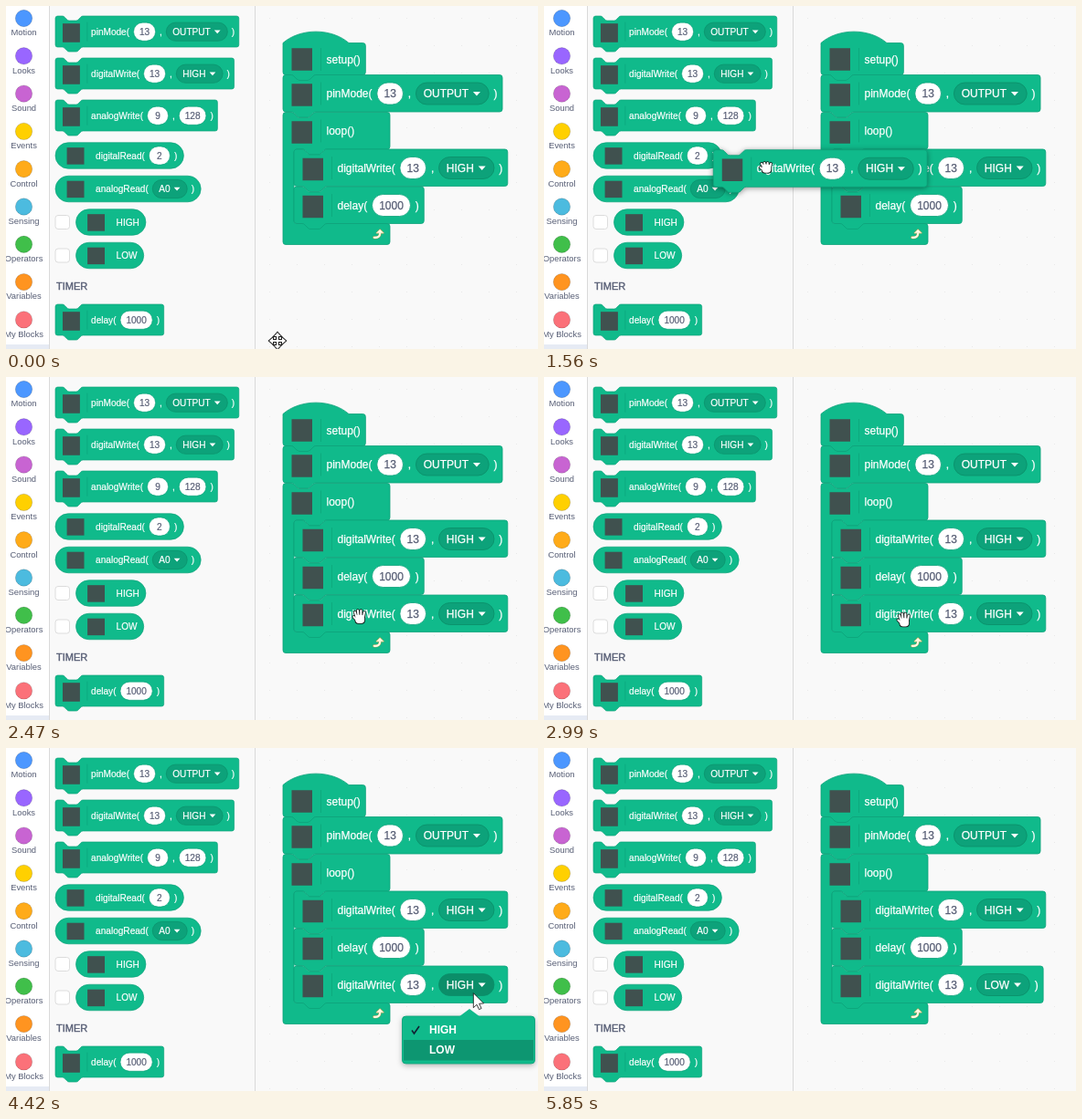
An HTML page with a canvas that plays this animation: 582 px wide and 376 px high, repeating every 6.63 s.

```html
<!DOCTYPE html>
<html lang="en">
<head>
<meta charset="utf-8">
<title>Block editor</title>
<style>
html, body { margin: 0; width: 100%; height: 100%; overflow: hidden; background: #f9f9f9; }
canvas { display: block; width: 582px; height: 376px; }
</style>
</head>
<body>
<canvas id="stage"></canvas>
<script>
const W = 582, H = 376, LOOP = 6630, STEP = 130;
const GREEN = '#10ba8b', MID = '#0da27a', DARK = '#0b8e69', TILE = '#40514f', INK = '#575e75';
const FONT = '"Liberation Sans", Arial, sans-serif';
const GAP = 5.3, PALETTE = 0.84;

const canvas = document.getElementById('stage');
const ctx = canvas.getContext('2d');
const ratio = window.devicePixelRatio || 1;
canvas.width = W * ratio;
canvas.height = H * ratio;

const CATEGORIES = [
  ['Motion', '#4c97ff'], ['Looks', '#9966ff'], ['Sound', '#c864d2'],
  ['Events', '#ffd000'], ['Control', '#ffab19'], ['Sensing', '#4cbbdf'],
  ['Operators', '#40bf4a'], ['Variables', '#ff9420'], ['My Blocks', '#fb7179']
];

// '#' marks a number field, '@' a dropdown
const PIN_MODE = ['pinMode(', '#13', ',', '@OUTPUT', ')'];
const WRITE_HIGH = ['digitalWrite(', '#13', ',', '@HIGH', ')'];
const WRITE_LOW = ['digitalWrite(', '#13', ',', '@LOW', ')'];
const DELAY = ['delay(', '#1000', ')'];

// A thin outline gives the medium weight
function text(str, x, y, { color = '#fff', size = 12, align = 'left', weight = '', medium = 0.25 } = {}) {
  ctx.font = `${weight} ${size}px ${FONT}`;
  ctx.textAlign = align;
  ctx.fillStyle = ctx.strokeStyle = color;
  ctx.fillText(str, x, y + size * 0.35);
  if (!medium) return;
  ctx.lineWidth = medium;
  ctx.strokeText(str, x, y + size * 0.35);
}

function box(x, y, w, h, r, fill, stroke) {
  ctx.beginPath();
  ctx.roundRect(x, y, w, h, r);
  ctx.fillStyle = fill;
  ctx.fill();
  if (stroke) {
    ctx.strokeStyle = stroke;
    ctx.lineWidth = 0.8;
    ctx.stroke();
  }
}

function at(x, y, scale, draw) {
  ctx.save();
  ctx.translate(x, y);
  ctx.scale(scale, scale);
  draw();
  ctx.restore();
}

function partWidth(part) {
  ctx.font = `12px ${FONT}`;
  const kind = part[0];
  if (kind === '#') return Math.max(27.5, ctx.measureText(part.slice(1)).width + 15.3);
  if (kind === '@') return ctx.measureText(part.slice(1)).width + 30.5;
  return ctx.measureText(part).width;
}

const rowWidth = parts => parts.reduce((sum, p) => sum + partWidth(p) + GAP, -GAP);

function drawRow(parts, x, y, open) {
  for (const part of parts) {
    const w = partWidth(part), label = part.slice(1);
    if (part[0] === '#') {
      box(x, y - 12, w, 24, 12, '#fff', MID);
      text(label, x + w / 2, y, { color: INK, align: 'center' });
    } else if (part[0] === '@') {
      box(x, y - 12, w, 24, 12, open ? DARK : MID, DARK);
      text(label, x + 8.3, y);
      const a = x + w - 17.3;
      ctx.beginPath();
      ctx.moveTo(a, y - 2);
      ctx.lineTo(a + 8, y - 2);
      ctx.lineTo(a + 4, y + 2.5);
      ctx.closePath();
      ctx.fill();
    } else {
      text(part, x, y);
    }
    x += w + GAP;
  }
}

// Connector edge; dir -1 traces it right to left
function notch(x, y, dir) {
  const px = u => x + (dir > 0 ? u : 45 - u);
  const line = (u, v) => ctx.lineTo(px(u), y + v);
  const curve = (a, b, u, v) => ctx.quadraticCurveTo(px(a), y + b, px(u), y + v);
  line(9, 0);
  curve(11, 0, 12, 1.5);
  line(15, 4.5);
  curve(16, 6, 18, 6);
  line(27, 6);
  curve(29, 6, 30, 4.5);
  line(33, 1.5);
  curve(34, 0, 36, 0);
}

function blockPath(w, h, hat) {
  ctx.beginPath();
  if (hat) {
    ctx.moveTo(0, 3);
    ctx.lineTo(0, 0);
    ctx.bezierCurveTo(19, -16.5, 53, -16.5, 72, 0);
  } else {
    ctx.moveTo(0, 3);
    ctx.arcTo(0, 0, 3, 0, 3);
    notch(0, 0, 1);
  }
  ctx.arcTo(w, 0, w, 3, 3);
  ctx.arcTo(w, h, w - 3, h, 3);
  notch(0, h, -1);
  ctx.arcTo(0, h, 0, h - 3, 3);
  ctx.closePath();
}

function paint(fill = GREEN, stroke = MID) {
  ctx.fillStyle = fill;
  ctx.fill();
  ctx.shadowColor = 'transparent';
  if (!stroke) return;
  ctx.strokeStyle = stroke;
  ctx.lineWidth = 0.8;
  ctx.stroke();
}

function tile(x, y, h) {
  ctx.fillStyle = TILE;
  ctx.fillRect(x, y - h / 2, 22.5, h);
}

function divider(y, h) {
  ctx.fillStyle = 'rgba(11,142,105,.35)';
  ctx.fillRect(41, y - h / 2, 1, h);
}

function block(x, y, parts, { scale = 1, hat = false, open = false, shadow = false } = {}) {
  at(x, y, scale, () => {
    const h = hat ? 35 : 40.5, mid = hat ? 18 : 20.5;
    const indent = scale < 1 ? 46.5 : 47.5;
    blockPath(indent + rowWidth(parts) + 5.5, h, hat);
    if (shadow) {
      ctx.shadowColor = 'rgba(0,0,0,.45)';
      ctx.shadowBlur = 6 * ratio;
      ctx.shadowOffsetY = ratio;
    }
    paint();
    divider(mid, 25);
    tile(9.5, mid + (hat ? 0 : 1.5), 24.5);
    drawRow(parts, indent, mid, open);
  });
}

function reporter(x, y, parts) {
  at(x, y, PALETTE, () => {
    box(0, -17, 52.5 + rowWidth(parts) + 8.5, 34, 17, GREEN, MID);
    tile(15, 0.5, 22);
    drawRow(parts, 52.5, 0);
  });
}

function repeatArrow(x, y) {
  at(x, y, 0.85, () => {
    ctx.lineJoin = ctx.lineCap = 'round';
    for (const [color, width] of [['#a9a04a', 1.6], ['#fffbe8', 0.4]]) {
      ctx.strokeStyle = ctx.fillStyle = color;
      ctx.lineWidth = 2 + width;
      ctx.beginPath();
      ctx.moveTo(-5, 4.5);
      ctx.quadraticCurveTo(2.5, 5, 2.5, -1);
      ctx.stroke();
      ctx.lineWidth = width;
      ctx.beginPath();
      ctx.moveTo(-2, -1.5);
      ctx.lineTo(2.5, -6);
      ctx.lineTo(7, -1.5);
      ctx.closePath();
      ctx.fill();
      ctx.stroke();
    }
  });
}

function loopBlock(x, y, inner) {
  const w = 117, low = 40.5 + inner, end = low + 23;
  at(x, y, 1, () => {
    ctx.beginPath();
    ctx.moveTo(0, 3);
    ctx.arcTo(0, 0, 3, 0, 3);
    notch(0, 0, 1);
    ctx.arcTo(w, 0, w, 3, 3);
    ctx.arcTo(w, 40.5, w - 3, 40.5, 3);
    notch(12, 40.5, -1);
    ctx.arcTo(12, 40.5, 12, 43.5, 3);
    ctx.arcTo(12, low, 15, low, 3);
    ctx.arcTo(w, low, w, low + 3, 3);
    ctx.arcTo(w, end, w - 3, end, 3);
    ctx.arcTo(0, end, 0, end - 3, 3);
    ctx.closePath();
    paint();
    divider(20.5, 25);
    tile(9.5, 22, 24.5);
    text('loop()', 47.5, 20.5);
  });
  repeatArrow(x + 104, y + low + 11.5);
}

function backdrop() {
  ctx.fillStyle = '#f9f9f9';
  ctx.fillRect(0, 0, W, H);
  ctx.fillStyle = '#e9e9e9';
  for (let x = 288; x < W; x += 30)
    for (let y = 13; y < H; y += 30) ctx.fillRect(x, y, 1, 1);
  ctx.fillStyle = '#fff';
  ctx.fillRect(0, 0, 47, H);
  ctx.fillStyle = '#e6ebf4';
  ctx.fillRect(0, 371, 47, 5);
  ctx.fillStyle = '#d9d9d9';
  ctx.fillRect(47, 0, 1, H);
  ctx.fillRect(272, 0, 1, H);
  CATEGORIES.forEach(([name, color], i) => {
    const y = 13.5 + i * 41.3;
    ctx.beginPath();
    ctx.arc(19.5, y, 9.2, 0, 7);
    paint(color, 'rgba(0,0,0,.2)');
    text(name, 19.5, y + 15.6, { color: INK, size: 9.4, align: 'center', medium: 0 });
  });
}

function palette() {
  const small = { scale: PALETTE };
  block(54, 11, PIN_MODE, small);
  block(54, 57, WRITE_HIGH, small);
  block(54, 103, ['analogWrite(', '#9', ',', '#128', ')'], small);
  reporter(54, 164, ['digitalRead(', '#2', ')']);
  reporter(54, 200.5, ['analogRead(', '@A0', ')']);
  [['HIGH', 237], ['LOW', 273.5]].forEach(([name, y]) => {
    box(54, y - 7.5, 15.5, 15, 3, '#fff', '#d5d5d5');
    reporter(76.5, y, [name]);
  });
  text('TIMER', 55, 307, { color: INK, size: 11, medium: 0.4 });
  block(54, 327, DELAY, small);
}

function menu() {
  ctx.save();
  ctx.shadowColor = 'rgba(0,0,0,.3)';
  ctx.shadowBlur = 6 * ratio;
  ctx.shadowOffsetY = 2 * ratio;
  box(433.5, 294, 145, 52, 4, GREEN);
  ctx.restore();
  box(433.5, 294, 145, 52, 4, GREEN, MID);
  ctx.beginPath();
  ctx.moveTo(495, 295);
  ctx.lineTo(507, 286);
  ctx.lineTo(519, 295);
  paint(GREEN, null);
  ctx.fillStyle = '#0d9671';
  ctx.fillRect(435, 320, 142, 22.5);
  const bold = { weight: 'bold', medium: 0 };
  text('HIGH', 463, 309, bold);
  text('LOW', 463, 331, bold);
  ctx.strokeStyle = '#123';
  ctx.lineWidth = 1.6;
  ctx.beginPath();
  ctx.moveTo(444, 309.5);
  ctx.lineTo(446.5, 313);
  ctx.lineTo(452, 305);
  ctx.stroke();
}

function arrowCursor() {
  ctx.beginPath();
  ctx.moveTo(0, 0);
  [[0, 16], [3.7, 12.6], [6.2, 18], [8.8, 16.8], [6.3, 11.6], [11.3, 11.3]]
    .forEach(p => ctx.lineTo(...p));
  ctx.closePath();
  paint('#fff', '#111');
}

function moveCursor() {
  for (const [color, width] of [['#222', 2], ['#fff', 0]]) {
    for (let i = 0; i < 4; i++) {
      ctx.rotate(Math.PI / 2);
      ctx.beginPath();
      ctx.moveTo(-1, 1);
      [[-1, -5], [-3.5, -5], [0, -9], [3.5, -5], [1, -5], [1, 1]].forEach(p => ctx.lineTo(...p));
      ctx.closePath();
      paint(color, null);
      ctx.strokeStyle = color;
      ctx.lineWidth = width;
      if (width) ctx.stroke();
    }
  }
}

function handCursor(closed) {
  const reach = closed ? 0.5 : 1;
  const fingers = [[-3.5, 0, -5, -5], [-1, 0, -1.7, -7], [2, 0, 2, -6.8], [4.8, 1, 5.8, -4.8]];
  ctx.translate(0.5, 0.5);
  ctx.scale(0.93, 0.93);
  ctx.lineCap = 'round';
  for (const [color, grow] of [['#111', 0.8], ['#fff', 0]]) {
    ctx.strokeStyle = color;
    ctx.lineWidth = 2.3 + grow * 2;
    for (const [x, y, tx, ty] of fingers) {
      ctx.beginPath();
      ctx.moveTo(x, y);
      ctx.lineTo(tx, ty * reach);
      ctx.stroke();
    }
    ctx.beginPath();
    ctx.moveTo(-3, 4);
    ctx.lineTo(-6.5, closed ? 2 : 0.5);
    ctx.stroke();
    box(-4.5 - grow, -2 - grow, 10.5 + 2 * grow, 10 + 2 * grow, 4, color);
  }
}

// time, x, y of the pointer
const TRACK = [
  [0, 297, 367], [910, 110, 70], [1170, 110, 70], [1950, 374.5, 279.5],
  [2210, 374.5, 279.5], [2470, 386, 262], [2990, 393, 265.5], [3640, 512, 264],
  [4290, 512, 264], [5070, 503, 327], [5460, 503, 327], [5850, 480, 400], [LOOP, 480, 400]
];

function pointer(t) {
  const i = TRACK.findIndex(k => k[0] > t);
  const [t0, x0, y0] = TRACK[i - 1], [t1, x1, y1] = TRACK[i];
  const u = (t - t0) / (t1 - t0), e = u * u * (3 - 2 * u);
  return [x0 + (x1 - x0) * e, y0 + (y1 - y0) * e];
}

function cursor(t, x, y) {
  let shape = arrowCursor;
  if (t < 650 && x > 273) shape = moveCursor;
  else if (t >= 780 && t < 3380) shape = () => handCursor(t >= 1170 && t < 2470);
  at(x, y, 1, shape);
}

function render(t) {
  const [x, y] = pointer(t);
  const dragging = t >= 1170 && t < 2470;
  const slot = dragging && t >= 1820;
  const placed = t >= 2470;
  const open = t >= 4290 && t < 5460;

  ctx.setTransform(ratio, 0, 0, ratio, 0, 0);
  backdrop();
  palette();

  block(303, 40.5, ['setup()'], { hat: true });
  loopBlock(303, 116.5, slot || placed ? 122.5 : 81.5);
  block(303, 75.5, PIN_MODE);
  if (slot) at(315, 239, 1, () => {
    blockPath(234, 40.5);
    paint('#bdbdbd', null);
  });
  if (placed) block(315, 239, t >= 5460 ? WRITE_LOW : WRITE_HIGH, { open });
  block(315, 198, DELAY);
  block(315, 157, WRITE_HIGH);
  if (dragging) block(x - 57, y - 17, WRITE_HIGH, { shadow: true });
  if (open) menu();
  cursor(t, x, y);
}

const start = performance.now();
function tick() {
  const t = (performance.now() - start) % LOOP;
  render(Math.floor(t / STEP) * STEP);
  requestAnimationFrame(tick);
}
tick();
</script>
</body>
</html>
```
